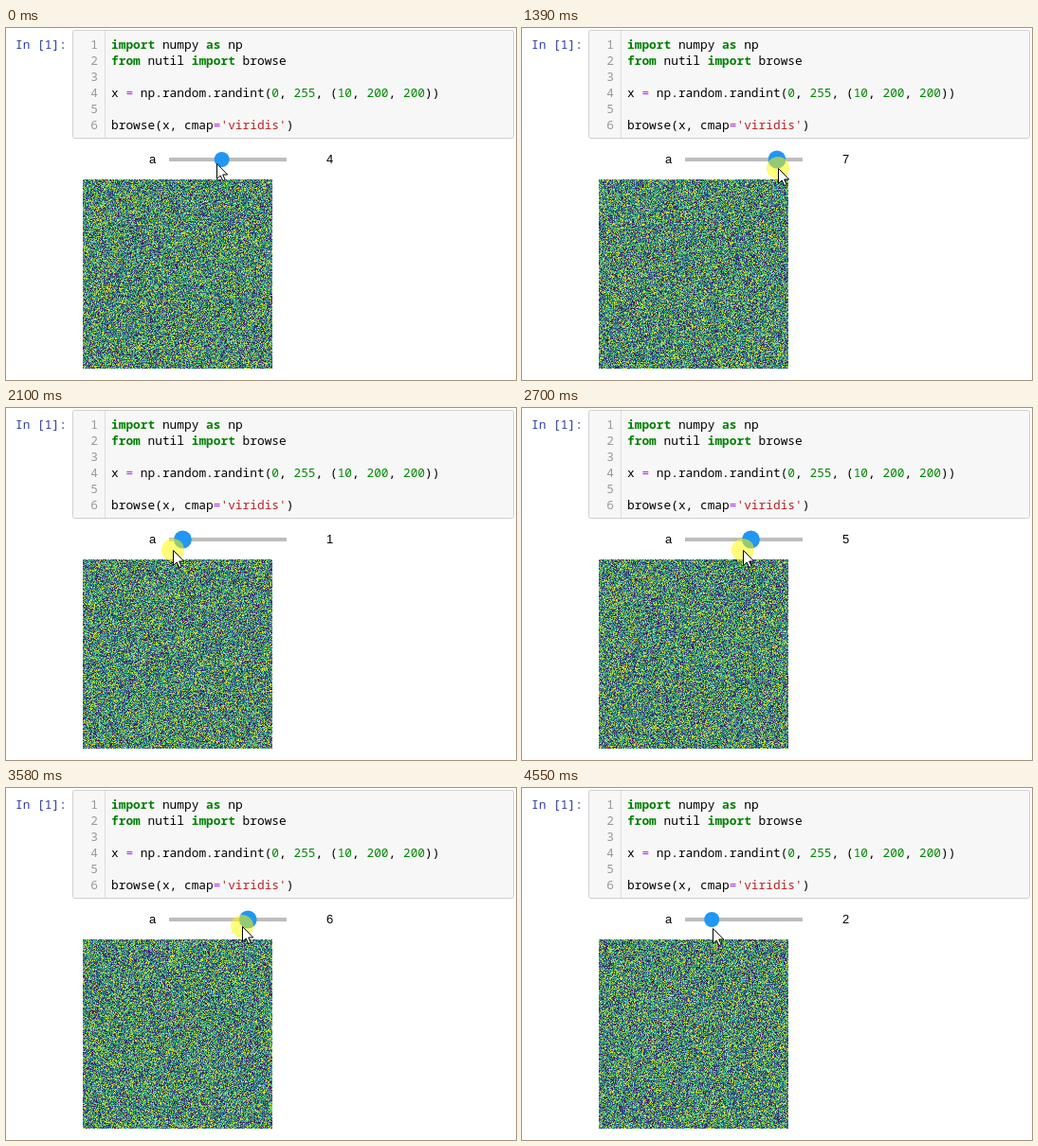
An HTML page with a canvas that plays this animation: 538 px wide and 372 px high, repeating every 4600 ms.

```html
<!DOCTYPE html>
<html lang="en">
<head>
<meta charset="utf-8">
<title>Array browser</title>
<style>
  html, body { margin: 0; width: 538px; height: 372px; overflow: hidden; background: #fff; }
  canvas { position: absolute; left: 81px; top: 160px; }
  svg { position: absolute; left: 0; top: 0; }
  .code { font: 12.83px "Noto Sans Mono", "DejaVu Sans Mono", monospace; }
  .label { font: 13px "Liberation Sans", Arial, sans-serif; }
  .num { fill: #999; text-anchor: end; }
  .k { fill: #008000; font-weight: bold; }
  .n { fill: #080; }
  .o { fill: #a2f; }
  .s { fill: #ba2121; }
</style>
</head>
<body>
<canvas id="plot" width="200" height="200"></canvas>
<svg width="538" height="372">
  <rect x="70.5" y="2.5" width="465" height="114" rx="2" fill="#f7f7f7" stroke="#cfcfcf"/>
  <path d="M104.5 3V116" stroke="#ddd"/>
  <g class="code">
    <text x="10" y="22" fill="#303f9f">In [1]:</text>
    <g id="numbers" class="num"></g>
    <text x="111" y="22"><tspan class="k">import</tspan> numpy <tspan class="k">as</tspan> np</text>
    <text x="111" y="39"><tspan class="k">from</tspan> nutil <tspan class="k">import</tspan> browse</text>
    <text x="111" y="73">x <tspan class="o">=</tspan> np.random.randint(<tspan class="n">0</tspan>, <tspan class="n">255</tspan>, (<tspan class="n">10</tspan>, <tspan class="n">200</tspan>, <tspan class="n">200</tspan>))</text>
    <text x="111" y="107">browse(x, cmap<tspan class="o">=</tspan><tspan class="s">'viridis'</tspan>)</text>
  </g>
  <text class="label" x="151" y="143">a</text>
  <text class="label" x="338" y="143" id="readout">4</text>
  <rect x="172" y="137" width="124" height="4" fill="#bdbdbd"/>
  <circle id="knob" cy="139" r="8" fill="#2196f3"/>
  <g id="pointer">
    <circle id="glow" r="12" fill="#fffa00" fill-opacity=".53"/>
    <path d="M.5 .5V16.5L4.2 13L6.8 18.6L9.2 17.5L6.7 12H11.7Z" fill="#fff" stroke="#000"/>
  </g>
</svg>
<script>
const $ = id => document.getElementById(id);
const LOOP = 4600, PRESS = 180, RELEASE = 4370, REDRAW_LAG = 60;
const LEFT = 172.7, STEP = 13.75, GRIP = 3.575;

// turning points of the drag: time, x, y
const path = [
  [PRESS, 222, 143], [970, 295, 147], [1120, 295, 148], [2260, 163.5, 150],
  [2470, 163.5, 150], [2700, 233, 150], [3250, 295, 147], [3400, 295, 147],
  [3580, 249, 146], [4000, 206, 147], [RELEASE, 206, 147], [4550, 201, 148]
];

const mix = (a, b, f) => a + (b - a) * f;
const clamp = (v, low, high) => Math.max(low, Math.min(high, v));
// halfway between linear and smoothstep
const ease = f => (f + f * f * (3 - 2 * f)) / 2;

function pointerAt(t) {
  const i = Math.max(0, path.findLastIndex(p => p[0] <= t));
  const a = path[i], b = path[i + 1] || a;
  const f = ease(clamp((t - a[0]) / (b[0] - a[0] || 1), 0, 1));
  return [mix(a[1], b[1], f), mix(a[2], b[2], f)];
}

const valueAt = t =>
  clamp(Math.round((pointerAt(t)[0] + GRIP - LEFT) / STEP), 0, 9);

function random(seed) {
  return () => {
    seed = seed + 0x6d2b79f5 | 0;
    let r = Math.imul(seed ^ seed >>> 15, 1 | seed);
    r ^= r + Math.imul(r ^ r >>> 7, 61 | r);
    return ((r ^ r >>> 14) >>> 0) / 4294967296;
  };
}

const viridis = [0x440154, 0x3b528b, 0x21918c, 0x5ec962, 0xfde725];

function viridisAt(f) {
  const i = Math.floor(f * 4);
  return [16, 8, 0].map(shift =>
    mix(viridis[i] >> shift & 255, viridis[i + 1] >> shift & 255, f * 4 - i));
}

const ctx = $("plot").getContext("2d");
const slices = Array.from({ length: 10 }, (_, n) => {
  const image = ctx.createImageData(200, 200), next = random(n + 1);
  for (let i = 0; i < image.data.length; i += 4)
    image.data.set([...viridisAt(next()), 255], i);
  return image;
});

for (let i = 1; i <= 6; i++)
  $("numbers").innerHTML += `<text x="97" y="${5 + 17 * i}">${i}</text>`;

let shown = -1;
function draw(now) {
  const t = now % LOOP, value = valueAt(t), slice = valueAt(t - REDRAW_LAG);
  const held = t >= PRESS && t < RELEASE;
  $("readout").textContent = value;
  $("knob").setAttribute("cx", LEFT + value * STEP);
  $("knob").setAttribute("r", held ? 9.4 : 8);
  $("glow").setAttribute("visibility", held ? "visible" : "hidden");
  $("pointer").setAttribute("transform", `translate(${pointerAt(t).map(Math.round)})`);
  if (slice !== shown) ctx.putImageData(slices[shown = slice], 0, 0);
}

const start = performance.now();
function tick() {
  draw(performance.now() - start);
  requestAnimationFrame(tick);
}
tick();
</script>
</body>
</html>
```
